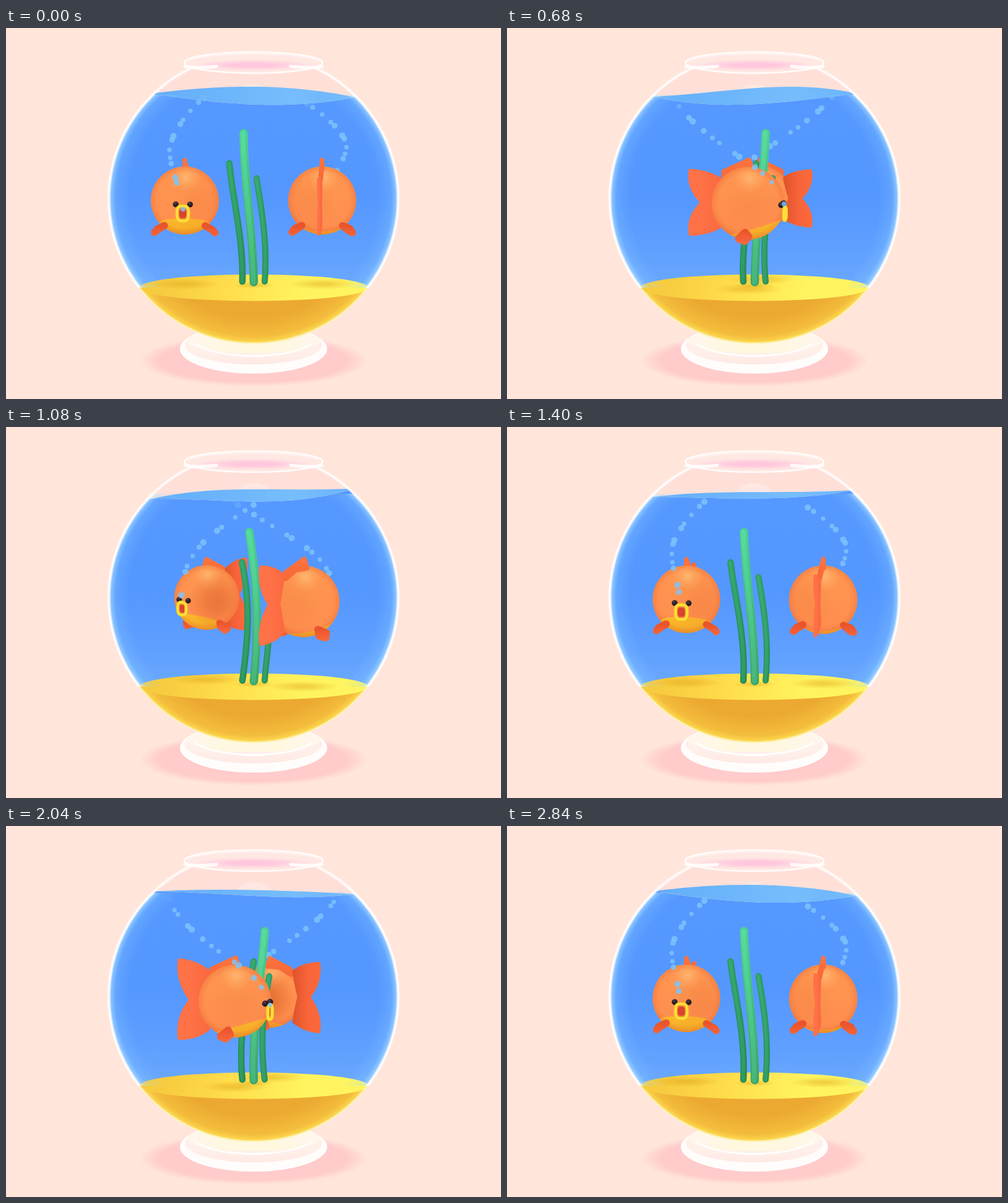
An HTML page with a canvas for the animation above (2.88 s loop, 800 by 600 pixels).

```html
<!DOCTYPE html>
<html lang="en">
<head>
<meta charset="utf-8">
<title>Fish bowl</title>
<style>
  html, body { margin: 0; width: 100%; height: 100%; overflow: hidden; background: #ffe5da; }
  canvas { display: block; width: 800px; height: 600px; }
</style>
</head>
<body>
<canvas id="stage" width="800" height="600"></canvas>
<script>
const g = document.getElementById('stage').getContext('2d');
const LOOP = 2880, HALF = LOOP / 2, STEP = 40, TAU = Math.PI * 2;
const BOWL = { x: 400, y: 276, r: 234 };
const SAND_Y = 420;
const { sin, cos, exp, min, max, abs, sign, sqrt } = Math;

function ellipse(x, y, rx, ry = rx) {
  g.beginPath();
  g.ellipse(x, y, rx, ry, 0, 0, TAU);
}
function fill(style) { g.fillStyle = style; g.fill(); }
function stroke(style, width) { g.strokeStyle = style; g.lineWidth = width; g.stroke(); }
function addStops(gradient, stops) {
  stops.forEach(([at, color]) => gradient.addColorStop(at, color));
  return gradient;
}
function linear(x0, y0, x1, y1, ...stops) {
  return addStops(g.createLinearGradient(x0, y0, x1, y1), stops);
}
function radial(x, y, r, ...stops) {
  return addStops(g.createRadialGradient(x, y, 0, x, y, r), stops);
}
function softEllipse(x, y, rx, ry, core, rgb, alpha) {
  g.save();
  g.translate(x, y);
  g.scale(1, ry / rx);
  ellipse(0, 0, rx);
  fill(radial(0, 0, rx, [0, `rgba(${rgb},${alpha})`], [core, `rgba(${rgb},${alpha})`], [1, `rgba(${rgb},0)`]));
  g.restore();
}
function bowlPath() { ellipse(BOWL.x, BOWL.y, BOWL.r); }
function within(y0, y1, paint) {
  g.save();
  g.beginPath();
  g.rect(100, y0, 600, y1 - y0);
  g.clip();
  paint();
  g.restore();
}

// Water heights: time, left, back 1, back 2, right, front 1, front 2
const WAVES = [
  [0, 106, 96, 97, 112, 120, 124],
  [680, 111, 102, 95, 106, 124, 119],
  [1080, 116, 102, 101, 99, 119, 119],
  [1720, 109, 109, 108, 106, 112, 110],
  [2040, 106, 103, 105, 110, 110, 115],
  [2440, 100, 100, 102, 116, 113, 119]
];
function waterAt(t) {
  const n = WAVES.length;
  let i = n - 1;
  while (WAVES[i][0] > t) i--;
  const row = k => WAVES[(k + n) % n];
  const span = (i + 1 < n ? WAVES[i + 1][0] : LOOP) - row(i)[0];
  const u = (t - row(i)[0]) / span;
  const [a, b, c, d] = [row(i - 1), row(i), row(i + 1), row(i + 2)];
  return b.map((v, k) => v + u * (c[k] - a[k] + u * (2 * a[k] - 5 * v + 4 * c[k] - d[k]
    + u * (3 * (v - c[k]) + d[k] - a[k]))) / 2).slice(1);
}
function surfaceLine(p0, p1, p2, p3, backwards) {
  for (let i = 0; i <= 30; i++) {
    const u = (backwards ? 30 - i : i) / 30, a = 3 * u - 1, b = 3 * u - 2, c = u - 1;
    const y = -p0 * a * b * c / 2 + 4.5 * p1 * u * b * c - 4.5 * p2 * u * a * c + p3 * u * a * b / 2;
    g.lineTo(236 + 328 * u, y);
  }
}
function drawWater(t) {
  const [left, b1, b2, right, f1, f2] = waterAt(t);
  g.beginPath();
  g.moveTo(150, left);
  surfaceLine(left, f1, f2, right);
  g.lineTo(650, right);
  g.lineTo(650, 520);
  g.lineTo(150, 520);
  fill(linear(0, 110, 0, 420, [0, '#5598ff'], [.5, '#5497ff'], [.8, '#5f9fff'], [1, '#69a9ff']));
  g.beginPath();
  surfaceLine(left, b1, b2, right);
  surfaceLine(left, f1, f2, right, true);
  fill(linear(236, 0, 564, 0, [0, '#63aefa'], [.35, '#6cb5fb'], [.7, '#76bdfc'], [1, '#6bb4fc']));
}

function drawBackdrop() {
  g.fillStyle = '#ffe5da';
  g.fillRect(0, 0, 800, 600);
  softEllipse(400, 538, 184, 42, .82, '255,203,203', 1);
  // glass foot
  ellipse(400, 519, 119, 40);
  fill('#fffdfb');
  ellipse(400, 513, 111, 31);
  fill(linear(0, 500, 0, 544, [0, '#ffefe6'], [.5, '#fff0ea'], [1, '#ffe9e4']));
  ellipse(400, 506, 108, 20);
  fill(linear(288, 0, 512, 0, [0, '#fff6ee'], [.3, '#fff8e0'], [.7, '#fff8e0'], [1, '#fff6ee']));
  g.beginPath();
  g.ellipse(400, 500, 100, 30, 0, .35, Math.PI - .35);
  stroke('rgba(255,255,255,.9)', 3);
}

function drawSand(poses) {
  g.save();
  bowlPath();
  g.clip();
  within(SAND_Y, 520, () => {
    bowlPath();
    fill('#eca931');
    bowlPath();
    fill(radial(BOWL.x, BOWL.y, BOWL.r, [0, 'rgba(248,200,66,0)'], [.82, 'rgba(248,200,66,0)'],
      [.95, 'rgba(248,200,66,.6)'], [1, 'rgba(255,222,82,1)']));
  });
  ellipse(400.5, SAND_Y, 185, 21.5);
  fill(linear(260, 398, 480, 446, [0, '#f7cb3f'], [.45, '#ffdd4b'], [1, '#fff45f']));
  poses.forEach(p => softEllipse(p.x, 414 + 8 * p.z, 56, 9, .2, '222,160,25', .42));
  softEllipse(400, 416, 34, 5, .3, '215,165,30', .35);
  g.restore();
}

function drawStalk(t, s) {
  const points = [];
  for (let i = 0; i <= 24; i++) {
    const u = i / 24, phase = TAU * (t - s.delay) / HALF - 1.8 * (1 - u);
    points.push([s.x - s.sway * u ** .9 * cos(phase), s.base + (s.top - s.base) * u]);
  }
  const trace = (dx, style, width) => {
    g.beginPath();
    points.forEach(([x, y]) => g.lineTo(x + dx, y));
    stroke(style, width);
  };
  g.lineCap = g.lineJoin = 'round';
  const shade = ([hi, lo]) => linear(0, s.top, 0, s.base, [0, hi], [1, lo]);
  trace(0, shade(s.edge), s.width);
  trace(-s.width * .06, shade(s.face), s.width * .55);
}
const STALKS = [
  { x: 382, base: 410, top: 219, width: 10.5, sway: 21, delay: -5, edge: ['#2b9a64', '#278a56'], face: ['#36a870', '#2f9a63'] },
  { x: 418, base: 410, top: 243, width: 10, sway: 15, delay: 120, edge: ['#2c9c66', '#2a905b'], face: ['#38ab72', '#339f68'] },
  { x: 400.5, base: 411, top: 170, width: 13.5, sway: 18, delay: -95, edge: ['#4bd093', '#3aa66d'], face: ['#58dc9e', '#47b67b'] }
];

// Each fish circles the bowl once per loop; local axes are forward, up and side.
function poseAt(t, k) {
  const a = TAU * t / LOOP + k * Math.PI, yaw = a - .06, z = sin(a);
  const x = 400 - 111 * cos(a) * (1 + .05 * z), y = 279 + 4.5 * z, r = 55 * (1 + .07 * z);
  const project = (f, u, s = 0) => {
    const depth = f * cos(yaw) - s * sin(yaw);
    return [x + r * (f * sin(yaw) + s * cos(yaw)), y + r * (.11 * depth - u), depth];
  };
  return { x, y, z, r, k, project, facing: cos(yaw), turn: sin(yaw) };
}
function polygon(points) {
  g.beginPath();
  points.forEach(p => g.lineTo(p[0], p[1]));
  g.closePath();
}
function padded(style, width) {
  g.lineJoin = 'round';
  fill(style);
  stroke(style, width);
}

function drawTail(p, t) {
  const open = 1.04 - .15 * cos(TAU * t / 240);
  const at = (f, u) => p.project(f, u * open).slice(0, 2);
  const lobe = d => {
    g.moveTo(...at(-.95, 0));
    g.quadraticCurveTo(...at(-.86, .3 * d), ...at(-.78, .66 * d));
    g.quadraticCurveTo(...at(-1.1, .87 * d), ...at(-1.6, .9 * d));
    g.quadraticCurveTo(...at(-1.68, .42 * d), ...at(-1.27, 0));
    g.closePath();
  };
  const [x0] = at(-.8, 0), [x1] = at(-1.65, 0);
  const colors = p.z < 0 ? ['#e2552c', '#f8643a', '#fb693c'] : ['#fb6a40', '#fe7046', '#ff7248'];
  const style = linear(x0, 0, x1 + .1, 0, [0, colors[0]], [.5, colors[1]], [1, colors[2]]);
  g.beginPath();
  lobe(1);
  lobe(-1);
  padded(style, p.r * .11);
}
function drawDorsal(p) {
  polygon([[-.68, .68], [-.68, .86], [.02, 1.19], [.12, .92], [-.3, .9]].map(([f, u]) => p.project(f, u)));
  padded(linear(0, p.y - 1.25 * p.r, 0, p.y - .75 * p.r, [0, '#ff7440'], [1, '#f86a38']), p.r * .13);
}
function drawFin(p, side) {
  polygon([[0, -.74, .6], [.13, -.83, .8], [.03, -.94, .89], [-.14, -.89, .82]]
    .map(([f, u, s]) => p.project(f, u, s * side)));
  padded(linear(0, p.y + .75 * p.r, 0, p.y + 1.1 * p.r, [0, '#e9542c'], [1, '#f9673c']), p.r * .21);
}
function drawBelly(p) {
  // a cap tilted towards the face; its hidden points slide out to the rim
  const tilt = 1.28, half = .84, points = [];
  for (let i = 0; i < 120; i++) {
    const b = TAU * i / 120, ring = sin(half) * cos(b);
    const f = cos(half) * cos(tilt) + ring * sin(tilt);
    const u = -cos(half) * sin(tilt) + ring * cos(tilt);
    let [px, py, depth] = p.project(f, u, sin(half) * sin(b));
    if (depth + .11 * u < 0) {
      const d = sqrt((px - p.x) ** 2 + (py - p.y) ** 2);
      px = p.x + (px - p.x) / d * p.r;
      py = p.y + (py - p.y) / d * p.r;
    }
    points.push([px, py]);
  }
  polygon(points);
  fill(linear(0, p.y + p.r * .4, 0, p.y + p.r, [0, '#fcbb2e'], [.6, '#f9b22a'], [1, '#eda02a']));
}
function drawBody(p) {
  const { x, y, r } = p;
  ellipse(x, y, r);
  fill(radial(x + r * .04, y - r * .68, r * 1.75,
    [0, '#ffb670'], [.12, '#ffa35c'], [.25, '#ff9550'], [.8, '#ff8f4f'], [1, '#f67d42']));
  g.save();
  g.clip();
  drawBelly(p);
  const shadow = .1 + .42 * max(0, -p.z);
  const cx = x + (400 - x) / 111 * r * .45;
  ellipse(x, y, r);
  fill(radial(cx, y + r * .1, r * .9, [0, `rgba(205,75,25,${shadow})`], [.35, `rgba(205,75,25,${shadow * .8})`], [1, 'rgba(205,75,25,0)']));
  ellipse(x, y, r);
  fill(radial(x, y, r, [0, 'rgba(225,90,40,0)'], [.82, 'rgba(225,90,40,0)'], [1, 'rgba(225,90,40,.28)']));
  g.restore();
}
function drawEye(p, side) {
  const [x, y] = p.project(.95, -.01, side * .21), r = p.r * .085;
  ellipse(x, y, r);
  fill(radial(x - r * .2, y - r * .4, r * 1.3, [0, '#5b4a55'], [.4, '#33262e'], [1, '#21161c']));
}
function drawMouth(p, t) {
  const beat = cos(TAU * t / 480), w = .195 - .025 * beat, h = .195 + .025 * beat;
  const round = v => sign(v) * abs(v) ** .65;
  const loop = size => polygon(Array.from({ length: 40 }, (_, i) => {
    const b = TAU * i / 40;
    return p.project(1.02, -.27 + h * size * round(sin(b)), w * size * round(cos(b)));
  }));
  loop(1);
  fill('#f4803c');
  loop(.62);
  fill('#d9432f');
  loop(1);
  g.lineJoin = 'round';
  stroke('#f2c728', p.r * .1);
  stroke('#ffe13c', p.r * .055);
}
function drawBubbles(p, t) {
  const gap = HALF / 26, life = 690;
  const newest = Math.floor((t + 10) / gap);
  for (let n = newest - 13; n <= newest; n++) {
    const seed = (n + 52) % 26 + 1;
    const age = t + 10 - n * gap + 16 * sin(seed * 3.7);
    if (age < 0 || age > life) continue;
    const [mx, my] = poseAt(t - age, p.k).project(1.1, -.16);
    const x = 400 + (mx - 400) * (1 + .12 * min(1, age / 300)) + 3 * sin(seed * 12.9);
    const y = my - 35 * (1 - exp(-age / 55)) - .205 * age;
    ellipse(x, y, 4.4 + .8 * sin(seed * 5.1));
    fill(`rgba(124,197,250,${.82 * min(1, (life - age) / 70)})`);
  }
}
function drawFish(p, t) {
  const away = p.facing < 0;
  if (away) drawBubbles(p, t);
  const face = () => {
    [-1, 1].sort((a, b) => (a - b) * p.turn).reverse().forEach(s => drawEye(p, s));
    drawMouth(p, t);
  };
  const fins = near => [-1, 1].forEach(s => {
    if ((p.project(0, -.9, s * .8)[2] > -.12) === near) drawFin(p, s);
  });
  const faceNear = p.facing > -.08;
  if (!faceNear) face();
  if (!away) drawTail(p, t);
  if (p.facing > -.25) drawDorsal(p);
  fins(false);
  drawBody(p);
  fins(true);
  if (p.facing <= -.25) drawDorsal(p);
  if (away) drawTail(p, t);
  if (faceNear) face();
  if (!away) drawBubbles(p, t);
}

function drawGlass() {
  const { x, y, r } = BOWL;
  within(108, SAND_Y, () => {
    bowlPath();
    fill(radial(x, y, r, [0, 'rgba(150,215,255,0)'], [.86, 'rgba(150,215,255,0)'],
      [.95, 'rgba(150,215,255,.2)'], [.985, 'rgba(190,235,255,.55)'], [1, 'rgba(255,255,255,.9)']));
  });
  within(66, SAND_Y, () => {
    bowlPath();
    stroke('rgba(255,255,255,.35)', 6);
    bowlPath();
    stroke('rgba(255,255,255,.9)', 2.5);
  });
  within(SAND_Y, 520, () => {
    bowlPath();
    stroke('rgba(255,246,190,.75)', 3);
  });
  // rim
  g.lineCap = 'round';
  ellipse(400, 56, 112, 17);
  fill('rgba(255,233,228,.85)');
  softEllipse(400, 60, 98, 9, .35, '255,196,222', .9);
  ellipse(400, 56, 112, 17);
  stroke('rgba(255,255,255,.9)', 2.5);
  g.beginPath();
  g.ellipse(400, 55, 104, 13, 0, Math.PI, TAU);
  stroke('rgba(255,255,255,.6)', 1.5);
  [-1, 1].forEach(s => {
    g.beginPath();
    g.moveTo(400 + s * 111, 62);
    g.quadraticCurveTo(400 + s * 95, 66, 400 + s * 60, 62);
    stroke('rgba(255,255,255,.85)', 5);
  });
  // foot highlight
  g.beginPath();
  g.moveTo(384, 531);
  g.lineTo(416, 531);
  stroke('#ffffff', 2);
}

function draw(t) {
  const poses = [poseAt(t, 0), poseAt(t, 1)].sort((a, b) => a.z - b.z);
  drawBackdrop();
  g.save();
  bowlPath();
  g.clip();
  g.fillStyle = 'rgba(255,222,216,.7)';
  g.fillRect(150, 66, 500, 100);
  softEllipse(400, 108, 29, 18, .9, '255,236,234', .6);
  drawWater(t);
  g.restore();
  drawSand(poses);
  drawFish(poses[0], t);
  STALKS.forEach(s => drawStalk(t, s));
  drawFish(poses[1], t);
  drawGlass();
}

const start = performance.now();
function tick() {
  const t = (performance.now() - start) % LOOP;
  draw(Math.floor(t / STEP) * STEP);
  requestAnimationFrame(tick);
}
tick();
</script>
</body>
</html>
```
